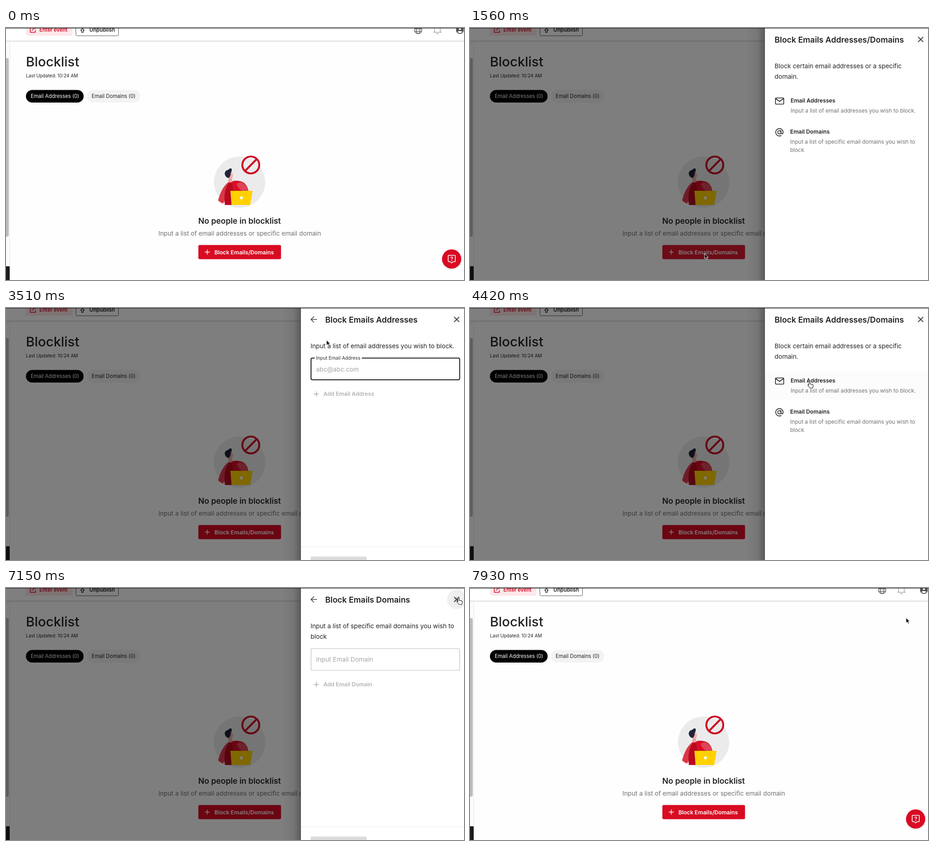
An HTML page that plays this animation: 1000 px wide and 551 px high, repeating every 8000 ms.

```html
<!DOCTYPE html>
<html lang="en">
<head>
<meta charset="utf-8">
<title>Blocklist</title>
<style>
html, body { margin: 0; width: 100%; height: 100%; overflow: hidden; background: #fff; }
svg { display: block; width: 100vw; height: 100vh; font-family: Inter, "Open Sans", sans-serif; fill: #222; }
.b { font-weight: 600; }
.mute { fill: #717171; }
.line { fill: none; stroke-linecap: round; stroke-linejoin: round; }
.s10 { font-size: 10.05px; }
.s11 { font-size: 11.2px; }
.s12 { font-size: 11.95px; }
.s14 { font-size: 13.72px; }
.s17 { font-size: 17.55px; }
</style>
</head>
<body>
<svg viewBox="0 0 1000 551" preserveAspectRatio="none">
  <defs>
    <clipPath id="btnClip"><rect x="420" y="474.500" width="180.500" height="31" rx="3"/></clipPath>
    <clipPath id="rowClip"><rect x="644" y="139" width="356" height="61"/><rect x="644" y="207" width="356" height="78"/></clipPath>
    <linearGradient id="edge">
      <stop offset="0" stop-opacity="0"/><stop offset=".6" stop-opacity=".07"/><stop offset="1" stop-opacity=".28"/>
    </linearGradient>
    <linearGradient id="under" x2="0" y2="1">
      <stop offset="0" stop-opacity=".14"/><stop offset="1" stop-opacity="0"/>
    </linearGradient>
  </defs>

  <!-- page -->
  <rect width="1000" height="551" fill="#fefefe"/>
  <rect y="30" width="8" height="491" fill="#fbfbfb"/>
  <rect x="8" y="30" width="1" height="521" fill="#e8e8e8"/>
  <rect x="-4" y="66" width="10" height="390" rx="3" fill="#bcbcbc"/>
  <rect y="521" width="8" height="30" fill="#1c1c1c"/>
  <rect width="1000" height="28" fill="#fff"/>
  <rect y="27.500" width="1000" height="4" fill="url(#under)"/>

  <rect x="43.500" y="-14" width="102" height="31" rx="4" fill="#fde7ea"/>
  <g class="line" stroke="#d80b26" stroke-width="1.5">
    <path d="M58-1h-5v10.500h11v-4M57 5l7-7M61-1h3v3"/>
  </g>
  <text class="b" x="73" y="8" font-size="11.15" fill="#d80b26">Enter event</text>
  <rect x="152.500" y="-14" width="93" height="31" rx="3" fill="#fff" stroke="#555"/>
  <path class="line" stroke="#222" stroke-width="1.3" d="M167 1l4 4h-2.300v4.500h-3.400v-4.500h-2.300z"/>
  <text class="b" x="182" y="8" font-size="11.4">Unpublish</text>
  <g class="line" stroke="#666" stroke-width="1.5">
    <circle cx="900" cy="4.500" r="8"/><ellipse cx="900" cy="4.500" rx="3.700" ry="8"/><path d="M892.500 2h15M892.500 7.500h15"/>
    <path stroke="#aaa" d="M934 9.500h16l-2-2.500v-5a6 6 0 0 0-12 0v5zM940 12.500h4"/>
  </g>
  <circle cx="991" cy="4.500" r="8.500" fill="#555"/>
  <path d="M985.500 8.500q5.500-4 11 0-5.500 5-11 0z" fill="#fff"/>
  <circle cx="991" cy="1.500" r="2.600" fill="#fff"/>

  <text x="43.500" y="84" font-size="28.9" font-weight="500">Blocklist</text>
  <text class="s10" x="43.500" y="108">Last Updated: 10:24 AM</text>
  <rect x="43.500" y="135.500" width="126" height="27.500" rx="13.75" fill="#000"/>
  <text class="s11" x="54" y="153" fill="#fff">Email Addresses (0)</text>
  <rect x="177" y="135.500" width="116" height="27.500" rx="13.75" fill="#f3f3f3"/>
  <text class="s11" x="187" y="153">Email Domains (0)</text>

  <!-- illustration -->
  <circle cx="510" cy="337" r="56" fill="#ebebeb"/>
  <path d="M489 335q-17 9-26 42 5 5 11 7l12-24z" fill="#d93848"/>
  <path d="M478 387q-4-38 12-51 6-2.500 15-2 13 1 19 9 5 7 5 16v28z" fill="#d80f27"/>
  <path d="M478 387q-4-38 12-51 6 6 5 18l-4 33z" fill="#b8091f"/>
  <path d="M504 341q6-6 15-1 9 5 10 16h-14q-10-7-11-15z" fill="#de4556"/>
  <path d="M486 325h7.500v9l2 1.500q-5 4-10 1z" fill="#f0a3a1"/>
  <path d="M488 315q7.500 0 7.500 7 0 7-6 7-5-4-1.500-14z" fill="#f4b0ac"/>
  <path d="M477.500 318q1-7 8-8 3-4.500 7-2.500 1.500 5-2 9.500 .500 6-4 11-8-1-9-10z" fill="#20223c"/>
  <path d="M490 356h48.500l-5.500 31h-40.500z" fill="#ffd100"/>
  <circle cx="514" cy="371.500" r="3.200" fill="#fff"/>
  <g fill="none" stroke="#ce0c24" stroke-width="4.200">
    <circle cx="534.500" cy="299.500" r="18.500"/><path d="M522 312.500l25.500-26"/>
  </g>

  <g text-anchor="middle">
    <text class="b" x="510" y="427.500" font-size="17.4">No people in blocklist</text>
    <text class="s14 mute" x="510.300" y="454">Input a list of email addresses or specific email domain</text>
  </g>
  <rect id="btn" x="420" y="474.500" width="180.500" height="31" rx="3" fill="#d80b22"/>
  <g clip-path="url(#btnClip)"><circle id="btnRip" cx="513" cy="492" fill="#fff"/></g>
  <path class="line" stroke="#fff" stroke-width="1.5" d="M434.500 490h10M439.500 485v10"/>
  <text class="b" x="455" y="494.500" font-size="12.15" fill="#fff">Block Emails/Domains</text>

  <circle cx="973" cy="508" r="22" opacity=".07"/>
  <circle cx="973" cy="505" r="21" fill="#d80b22"/>
  <path class="line" stroke="#fff" stroke-width="1.6" d="M967 497h12.500q1.500 0 1.500 1.500v11q0 1.500-1.500 1.500h-3.500l-2.800 3-2.800-3h-3.400q-1.500 0-1.500-1.500v-11q0-1.500 1.500-1.500z"/>
  <text class="b" x="973.200" y="508.500" font-size="12" fill="#fff" text-anchor="middle">?</text>

  <rect id="shade" width="1000" height="551" fill="#000"/>

  <!-- drawer -->
  <g id="drawer">
    <rect x="604" width="40" height="551" fill="url(#edge)"/>
    <rect x="644" width="356" height="551" fill="#fff"/>
    <circle id="closeBg" cx="984" cy="25" r="21" fill="#efefef"/>
    <circle id="closeRip" cx="984" cy="25" fill="#000" opacity=".1"/>
    <path class="line" stroke="#444" stroke-width="1.8" d="M979 20l10 10M989 20l-10 10"/>

    <g id="list">
      <rect id="rowA" x="644" y="139" width="356" height="61" fill="#f3f3f3"/>
      <rect id="rowB" x="644" y="207" width="356" height="78" fill="#f3f3f3"/>
      <g clip-path="url(#rowClip)"><circle id="rowRip" fill="#000"/></g>
      <text class="b s17" x="665" y="31.500">Block Emails Addresses/Domains</text>
      <text class="s14" x="665" y="87.500">Block certain email addresses or a specific</text>
      <text class="s14" x="665" y="111">domain.</text>
      <g class="line" stroke="#222" stroke-width="1.6">
        <rect x="667" y="153" width="18" height="13.500" rx="1.500"/><path d="M667.500 154.500l8.500 6 8.500-6"/>
        <circle cx="675.500" cy="228" r="3.600"/>
        <path d="M679.100 224.500v4.500q0 2.500 2.200 2.500 2.300 0 2.300-3.500a8.100 8.100 0 1 0-4.500 7.200"/>
      </g>
      <text class="b" x="700" y="162.500" font-size="12.2">Email Addresses</text>
      <text class="s12 mute" x="700" y="185">Input a list of email addresses you wish to block.</text>
      <text class="b" x="699" y="230.500" font-size="12.2">Email Domains</text>
      <text class="s12 mute" x="699" y="253">Input a list of specific email domains you wish to</text>
      <text class="s12 mute" x="699" y="270.500">block</text>
    </g>

    <g id="form">
      <circle id="backBg" cx="672" cy="25" r="19" fill="#f3f3f3"/>
      <path class="line" stroke="#444" stroke-width="1.700" d="M678.500 25h-12.500M672 19l-6 6 6 6"/>
      <text id="title" class="b s17" x="697" y="31.500"></text>
      <text id="lead1" class="s14" x="665" y="87.500"></text>
      <text id="lead2" class="s14" x="665" y="111">block</text>
      <g id="field">
        <rect id="box" x="666" y="132.500" width="324.500" height="47.500" rx="3" fill="#fff"/>
        <text id="label" x="677" fill="#222" stroke="#fff" stroke-linejoin="round" paint-order="stroke"></text>
        <text id="hint" x="677" y="161.500" font-size="13.75" fill="#a5a5a5"></text>
        <path class="line" stroke="#aaa" stroke-width="1.4" d="M672.500 211h10M677.500 206v10"/>
        <text id="add" class="b" x="693" y="215" font-size="12.2" fill="#b3b3b3"></text>
      </g>
      <rect x="644" y="521.500" width="356" height="1.500" fill="#f0f0f0"/>
      <rect x="665" y="543.500" width="122.500" height="20" rx="3" fill="#dcdcdc"/>
    </g>
  </g>

  <rect width="1000" height="1" fill="#222"/>

  <g id="cursor">
    <path id="arrow" d="M0 0v11.500l2.700-2.400 1.900 4.300 2-.9-1.900-4.200h3.600z" fill="#111" stroke="#fff" stroke-width=".9"/>
    <path id="hand" d="M-1.200 1.300a1.300 1.300 0 0 1 2.600 0v4.700l5 1.100q2 .5 2 2.500l-1 5.400h-6l-4.600-5.500q-.8-1.900 1-1.600l1 1z" fill="#fff" stroke="#222" stroke-width="1.100" stroke-linejoin="round"/>
    <path id="beam" class="line" stroke="#444" stroke-width="1.100" d="M-2.500-7q2 0 2.500 1.500.500-1.500 2.500-1.500M0-5.500v11M-2.500 7q2 0 2.500-1.500.500 1.500 2.500 1.500"/>
  </g>
</svg>
<script>
const LOOP = 8000, STEP = 130;
const el = {};
document.querySelectorAll('svg [id]').forEach(n => el[n.id] = n);

const clamp = v => Math.min(1, Math.max(0, v));
const ramp = (t, from, len) => clamp((t - from) / len);
const smooth = p => p * p * (3 - 2 * p);
const easeOut = p => 1 - (1 - p) ** 3;
const within = (t, a, b) => t >= a && t < b;
const pulse = (t, a, b, len = 150) => ramp(t, a, len) - ramp(t, b, len);
const show = (n, on) => n.style.display = on ? '' : 'none';
const set = (n, attrs) => { for (const k in attrs) n.setAttribute(k, attrs[k]); };

// pointer stops: time, x, y
const path = [
  [260, 600, 552], [1040, 512, 493], [1690, 512, 493], [2470, 760, 172], [2860, 760, 172],
  [3900, 672, 23], [4100, 672, 23], [4420, 741, 160], [4810, 752, 238], [5590, 752, 238],
  [5980, 786, 82], [6500, 895, 48], [7020, 988, 21], [7410, 988, 21], [7930, 952, 65]
];

function pointer(t) {
  const i = path.findIndex(p => p[0] > t);
  if (i < 0) return path[path.length - 1].slice(1);
  if (i === 0) return path[0].slice(1);
  const [t0, x0, y0] = path[i - 1], [t1, x1, y1] = path[i];
  const p = smooth((t - t0) / (t1 - t0));
  return [x0 + (x1 - x0) * p, y0 + (y1 - y0) * p];
}

function ripple(n, t, start, size, alpha) {
  const p = ramp(t, start, 420);
  set(n, { r: size * easeOut(p), opacity: p > 0 ? alpha * (1 - ramp(t, start + 300, 300)) : 0 });
}

function drawForm(t, mail) {
  const focus = mail ? t < 3900 : t < 7100;
  const what = mail ? 'Email Address' : 'Email Domain';
  el.title.textContent = mail ? 'Block Emails Addresses' : 'Block Emails Domains';
  el.lead1.textContent = mail ? 'Input a list of email addresses you wish to block.'
                              : 'Input a list of specific email domains you wish to';
  show(el.lead2, !mail);
  set(el.field, { transform: `translate(0 ${mail ? -23 : 0})` });
  set(el.box, { stroke: focus ? '#1f1a1c' : '#bdbdbd', 'stroke-width': focus ? 2 : 1.2 });
  el.label.textContent = 'Input ' + what;
  set(el.label, focus ? { y: 135.5, 'font-size': 10.3, fill: '#333', 'stroke-width': 8 }
                      : { y: 160.5, 'font-size': 13.75, fill: '#a5a5a5', 'stroke-width': 0 });
  el.hint.textContent = mail ? 'abc@abc.com' : 'abc.com';
  show(el.hint, focus);
  el.add.textContent = 'Add ' + what;
  set(el.backBg, { opacity: mail ? pulse(t, 3700, 4160) : 0 });
}

function draw(t) {
  const shade = smooth(ramp(t, 1075, 225)) * (1 - smooth(ramp(t, 7300, 220)));
  const slide = easeOut(ramp(t, 1180, 300)) * (1 - smooth(ramp(t, 7290, 200)));
  set(el.shade, { opacity: 0.5 * shade });
  set(el.drawer, { transform: `translate(${356 * (1 - slide)} 0)` });
  show(el.drawer, slide > 0);

  set(el.btn, { fill: within(t, 900, 1300) ? '#a2071b' : '#d80b22' });
  ripple(el.btnRip, t, 1040, 107, 0.2);

  const mail = within(t, 2990, 4160), domain = t >= 5070;
  show(el.list, !mail && !domain);
  show(el.form, mail || domain);
  if (mail || domain) drawForm(t, mail);

  set(el.rowA, { opacity: t < 4000 ? pulse(t, 2210, 2990) : 0.25 * pulse(t, 4270, 4560) });
  set(el.rowB, { opacity: 0.3 * pulse(t, 4600, 5200) });
  const first = t < 4000;
  set(el.rowRip, first ? { cx: 759, cy: 175 } : { cx: 752, cy: 242 });
  ripple(el.rowRip, t, first ? 2705 : 4915, 95, 0.1);
  set(el.closeBg, { opacity: pulse(t, 6860, 7500) });
  ripple(el.closeRip, t, 7110, 22, 0.1);

  const [x, y] = pointer(t);
  const beam = within(t, 5850, 6240);
  const hand = within(t, 2210, 2990) || within(t, 3700, 4160) || within(t, 4400, 5070) || within(t, 6890, 7400);
  set(el.cursor, { transform: `translate(${x} ${y})` });
  show(el.cursor, t >= 390);
  show(el.arrow, !hand && !beam);
  show(el.hand, hand);
  show(el.beam, beam);
}

function tick() {
  const t = performance.now() % LOOP;
  draw(Math.floor(t / STEP) * STEP);
  requestAnimationFrame(tick);
}
tick();
</script>
</body>
</html>
```
